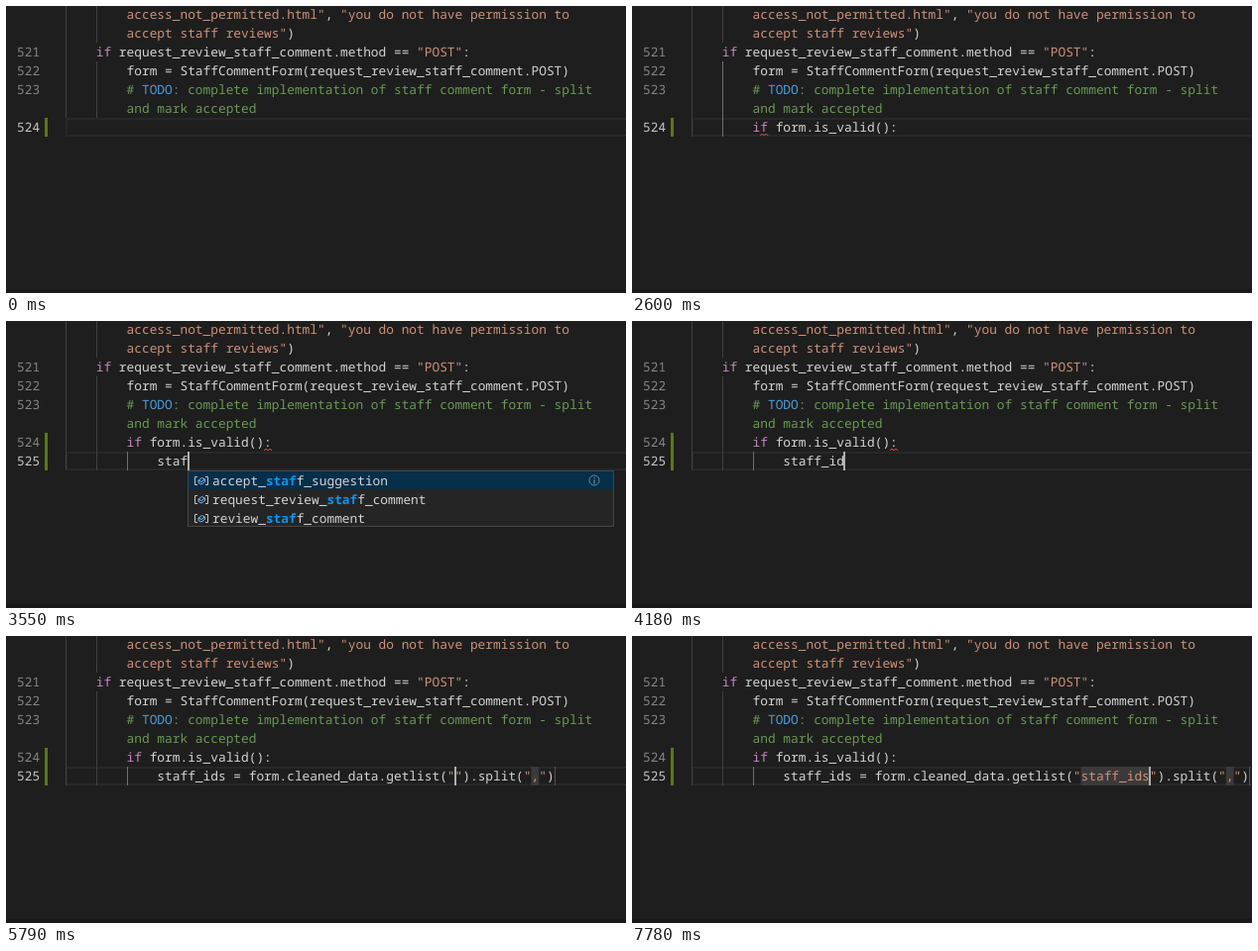
Recreate the animation shown at these times as an HTML page. Size 625 by 290 pixels, loop 8000 ms.

```html
<!DOCTYPE html>
<html lang="en">
<head>
<meta charset="utf-8">
<title>Code editor</title>
<style>
html, body { margin: 0; width: 100%; height: 100%; overflow: hidden; background: #1e1e1e; }
svg { display: block; }
text {
  font: 12.83px "Noto Sans Mono", "DejaVu Sans Mono", monospace;
  white-space: pre;
  text-rendering: geometricPrecision;
}
</style>
</head>
<body>
<svg id="stage" width="625" height="290" viewBox="0 0 625 290"></svg>
<script>
const LOOP = 8000, CHAR = 7.697, LEFT = 60, ROW = 19;
const C = {
  text: '#d4d4d4', string: '#ce9178', keyword: '#c586c0', comment: '#6a9955', todo: '#4a9ddd',
  ghost: '#757575', number: '#858585', active: '#c6c6c6', guide: '#404040', guideOn: '#707070',
  match: '#0097fb', error: '#f14c4c'
};
const IF_ROW = 113, BODY_ROW = 132;

// Each list holds [start time, value]; the last started entry is current.
const ifLine = [[0, ''], [1240, 'i'], [1350, 'if'], [1450, 'if '], [2100, 'if form.is_valid():']];
const bodyLine = [
  [0, ''], [3120, 's'], [3230, 'st'], [3380, 'sta'], [3550, 'staf'], [3620, 'staff'], [3760, 'staff_'],
  [3930, 'staff_i'], [4060, 'staff_id'], [4200, 'staff_ids'], [4510, 'staff_ids ']
];
const fieldName = [
  [0, ''], [6230, 's'], [6340, 'st'], [6450, 'sta'], [6590, 'staf'], [6660, 'staff'],
  [6810, 'staff_'], [6900, 'staff_i'], [6980, 'staff_id'], [7050, 'staff_ids']
];
const INDENT_AT = 900, ENTER_AT = 2850, ACCEPT_AT = 5560;
const caretOff = [[0, 170], [670, 900], [2600, 2850], [5010, 5330], [7550, 7780]];

const staffItems = ['accept_staff_suggestion', 'request_review_staff_comment', 'review_staff_comment'];
const moreItems = ['staticmethod', 'str', 'StopIteration', 'StopAsyncIteration', 'SystemError'];
const menus = [
  [0, null],
  [1350, { word: 'if', items: ['if', 'if', 'if/else'], icons: ['keyword', 'snippet', 'snippet'] }],
  [1450, null],
  [3300, { word: 'st', items: [...staffItems, ...moreItems] }],
  [3380, { word: 'sta', items: [...staffItems, moreItems[0]] }],
  [3550, { word: 'staf', items: staffItems }],
  [3620, { word: 'staff', items: staffItems }],
  [3760, { word: 'staff_', items: staffItems }],
  [3930, null]
];

const pick = (list, t) => list.filter(([start]) => start <= t).pop()[1];
const within = (t, a, b) => t >= a && t < b;
const colX = col => LEFT + col * CHAR;
const escape = s => s.replace(/&/g, '&amp;').replace(/</g, '&lt;');
const rect = (x, y, w, h, fill, extra = '') =>
  `<rect x="${x}" y="${y}" width="${w}" height="${h}" fill="${fill}" ${extra}/>`;
const path = (d, stroke) => `<path d="${d}" fill="none" stroke="${stroke}"/>`;
const label = (x, top, s, fill, extra = '') =>
  s ? `<text x="${x.toFixed(2)}" y="${top + 14}" fill="${fill}" ${extra}>${escape(s)}</text>` : '';

// Parts alternate text and colour name.
function colored(col, top, ...parts) {
  let out = '';
  for (let i = 0; i < parts.length; i += 2) {
    out += label(colX(col), top, parts[i], C[parts[i + 1]]);
    col += parts[i].length;
  }
  return out;
}

function code(col, top, s) {
  const parts = s.split(/("[^"]*"|\bif\b)/).filter(Boolean);
  const kind = p => p === 'if' ? 'keyword' : p[0] === '"' ? 'string' : 'text';
  return colored(col, top, ...parts.flatMap(p => [p, kind(p)]));
}

const lineNumber = (n, top, active) => label(11, top, String(n), active ? C.active : C.number);
const guide = (col, top, bottom, on) =>
  rect(Math.round(colX(col)), top, 1, bottom - top, on ? C.guideOn : C.guide);
const squiggle = (col, top) =>
  path(`M${colX(col).toFixed(1)} ${top + 18}l2 -2l2 2l2 -2l2 2`, C.error);

const icons = {
  keyword: (x, y) => path(
    `M${x} ${y + 4.5}h6m2 0h5M${x} ${y + 8.5}h3m2 0h8M${x} ${y + 12.5}h8m2 0h4`, C.active) +
    path(`M${x + 1.5} ${y + 4}v2h5v-2`, C.active),
  snippet: (x, y) => path(`M${x + 1.5} ${y + 15}v-11h12v11`, C.active) +
    `<path d="M${x + 1} ${y + 15.5}h13" stroke="${C.active}" stroke-dasharray="2 1.5"/>`,
  variable: (x, y) => path(
    `M${x + 3} ${y + 5.5}h-2.5v8h2.5M${x + 11} ${y + 5.5}h2.5v8h-2.5`, C.active) +
    path(`M${x + 4} ${y + 9}l3.5 -2.5l3 1.5v2.5l-3.5 2.5l-3 -1.5zl3 1.5l3.5 -2.5`, '#75beff')
};

function menu({ word, items, icons: kinds }, x, top) {
  const height = items.length * ROW;
  let out = rect(x + .5, top + .5, 429, height - 1, '#252526', 'stroke="#454545"') +
    rect(x + 1, top + 1, 428, ROW - 1, '#062f4a');
  items.forEach((item, i) => {
    const y = top + 1 + i * ROW, at = item.toLowerCase().indexOf(word);
    out += icons[kinds ? kinds[i] : 'variable'](x + 7, y);
    let tx = x + 25;
    const from = Math.max(at, 0), to = at < 0 ? 0 : at + word.length;
    [item.slice(0, from), item.slice(from, to), item.slice(to)].forEach((s, part) => {
      out += part === 1 ? label(tx, y, s, C.match, 'font-weight="700" style="font-weight:700"')
                        : label(tx, y, s, C.text);
      tx += s.length * CHAR;
    });
  });
  if (!kinds) {
    out += `<circle cx="${x + 410}" cy="${top + 10}" r="5" fill="none" stroke="#6f8799"/>` +
      path(`M${x + 410} ${top + 7}v1.3m0 1.2v4`, '#8ba0ae');
  }
  return out;
}

const backdrop = rect(0, 0, 625, 290, '#1e1e1e') + rect(0, 286, 625, 4, '#191919');
const fixedCode =
  colored(8, -1, 'access_not_permitted.html"', 'string', ', ', 'text', '"you do not have permission to', 'string') +
  colored(8, 18, 'accept staff reviews"', 'string', ')', 'text') +
  code(4, 37, 'if request_review_staff_comment.method == "POST":') +
  code(8, 56, 'form = StaffCommentForm(request_review_staff_comment.POST)') +
  colored(8, 75, '# ', 'comment', 'TODO', 'todo',
    ': complete implementation of staff comment form - split', 'comment') +
  colored(8, 94, 'and mark accepted', 'comment') +
  lineNumber(521, 37) + lineNumber(522, 56) + lineNumber(523, 75);

function scene(t) {
  const entered = t >= ENTER_AT, accepted = t >= ACCEPT_AT, indented = t >= INDENT_AT;
  const top = entered ? BODY_ROW : IF_ROW;
  const first = pick(ifLine, t), field = pick(fieldName, t);
  const body = accepted
    ? `staff_ids = form.cleaned_data.getlist("${field}").split(",")`
    : pick(bodyLine, t);
  const fieldCol = 51, fieldEnd = fieldCol + field.length;
  const caretCol = accepted ? fieldEnd : entered ? 12 + body.length : (indented ? 8 : 0) + first.length;
  const bottom = entered ? 151 : indented ? 132 : 113;

  let out = backdrop + rect(61, top + 1, 570, ROW - 2, 'none', 'stroke="#282828" stroke-width="2"');
  out += guide(0, 0, bottom) + guide(4, 0, 37) + guide(4, 56, bottom, indented && !entered);
  if (entered) out += guide(8, BODY_ROW, 151, true);
  out += rect(39, IF_ROW, 3, entered ? 38 : ROW, '#587c0c');

  if (accepted) {
    const hole = (col, n) => rect(colX(col).toFixed(1), BODY_ROW, Math.max(1, n * CHAR).toFixed(1), ROW, '#3a3a3a');
    out += hole(fieldCol, field.length) + hole(fieldEnd + 10, 1) +
      rect(Math.round(colX(fieldEnd + 13)), BODY_ROW, 1, ROW, '#525252');
  }

  out += fixedCode + lineNumber(524, IF_ROW, !entered) + code(8, IF_ROW, first);
  if (entered) out += lineNumber(525, BODY_ROW, true) + code(12, BODY_ROW, body);
  if (within(t, 1680, 2100)) out += colored(11, IF_ROW, 'form.is_valid():', 'ghost');
  if (within(t, 4690, ACCEPT_AT))
    out += colored(22, BODY_ROW, '= form.cleaned_data.getlist("").split(",")', 'ghost');
  if (within(t, 2320, ENTER_AT)) out += squiggle(9, IF_ROW);
  if (within(t, 3000, 4910)) out += squiggle(26, IF_ROW);

  const caretX = Math.floor(colX(caretCol));
  const list = pick(menus, t);
  if (list) out += menu(list, caretX, top + ROW);
  if (!caretOff.some(([a, b]) => within(t, a, b))) out += rect(caretX, top, 2, ROW, '#aeafad');
  return out;
}

const stage = document.getElementById('stage');
let shown = '';
let origin = null;
function draw(now) {
  origin ??= now;
  const next = scene((now - origin) % LOOP);
  if (next !== shown) stage.innerHTML = shown = next;
  requestAnimationFrame(draw);
}
stage.innerHTML = shown = scene(0);
requestAnimationFrame(draw);
</script>
</body>
</html>
```
